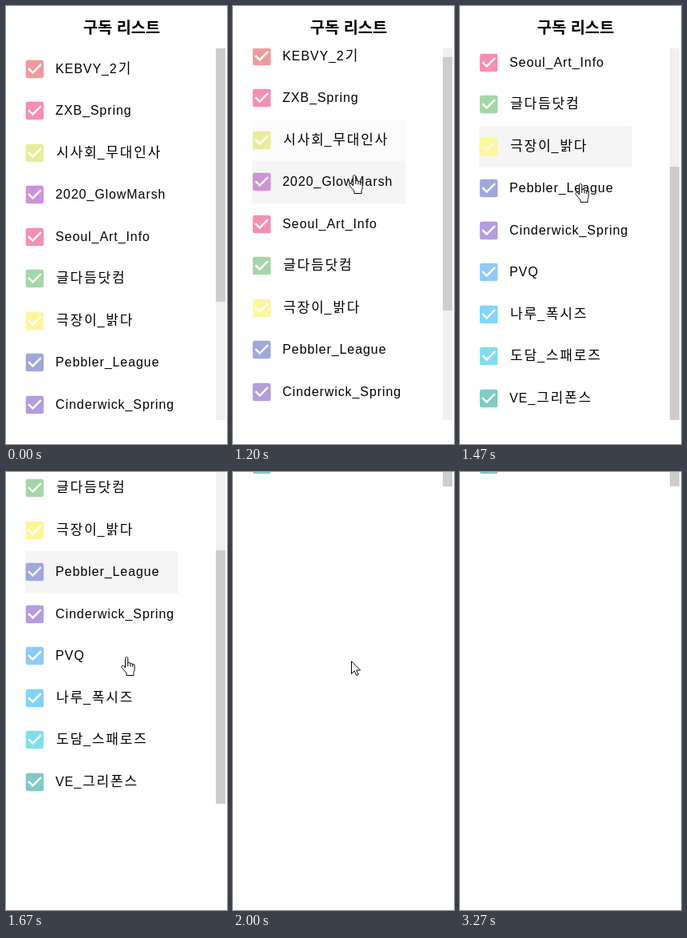
These frames come from a looping animation (277x548 px, 4340 ms). An HTML page:

```html
<!DOCTYPE html>
<html lang="ko">
<head>
<meta charset="utf-8">
<style>
html, body { margin: 0; width: 100%; height: 100%; overflow: hidden; background: #fff; }
#page { position: absolute; top: 0; left: 0; width: 277px; height: 548px; color: #000; }
h3 { position: absolute; margin: 0; left: 20px; top: 11px; width: 250px; text-align: center;
  font: bold 19.8px/29px "Noto Sans CJK KR", "Noto Sans CJK", sans-serif; }
#view { position: absolute; left: 24px; top: 53px; width: 239px; height: 465px; overflow: hidden; }
#list { position: absolute; left: 0; top: 0; }
.row { position: absolute; left: 0; width: 192px; height: 52.5px; white-space: nowrap;
  font: 16px/52.5px "Liberation Sans", Arial, sans-serif; letter-spacing: .93px; }
.row svg { position: absolute; left: -3px; top: 11px; width: 30px; height: 30px; }
.row p { position: absolute; margin: 0; left: 38px; top: 0; }
.row span { position: relative; left: 1px; letter-spacing: 1.86px;
  font: 300 17px/0 "Noto Sans CJK KR", "Noto Sans CJK", sans-serif; }
#bar { position: absolute; left: 263px; top: 53px; width: 12px; height: 465px; background: #f0f0f0; }
#thumb { position: absolute; left: 0; width: 12px; height: 317px; }
.cursor { position: absolute; display: none; width: 18px; height: 24px; fill: #fff; stroke: #000; stroke-linejoin: round; }
</style>
</head>
<body>
<div id="page">
  <h3>구독 리스트</h3>
  <div id="view"><div id="list"></div></div>
  <div id="bar"><div id="thumb"></div></div>
</div>
<svg id="arrow" class="cursor"><path d="M.5 .8V16.5L4.2 13L6.8 18.5L9.2 17.4L6.7 12H11.6Z"/></svg>
<svg id="hand" class="cursor"><path d="M5.5 14V2.3C5.5 -.1 8.8 -.1 8.8 2.3V8.2C9.3 6.8 12 7 12 9C12.5 7.8 14.7 8.2 14.7 10C15.3 9 17.2 9.4 17.2 11.4V15.5C17.2 18 16 19 16 20.5V23.5H7V21C5.5 18.5 3.5 16.6 1.2 13.6C.2 11.6 2.3 10.4 3.6 11.8Z"/><path d="M8.8 8V12M12 9V12.5M14.7 10V13" fill="none"/></svg>
<script>
const $ = id => document.getElementById(id);
const items = [
  ['KEBVY_2기', '#ef9a9a'], ['ZXB_Spring', '#f48fb1'], ['시사회_무대인사', '#e6ee9c'],
  ['2020_GlowMarsh', '#ce93d8'], ['Seoul_Art_Info', '#f48fb1'], ['글다듬닷컴', '#a5d6a7'],
  ['극장이_밝다', '#fff59d'], ['Pebbler_League', '#9fa8da'], ['Cinderwick_Spring', '#b39ddb'],
  ['PVQ', '#90caf9'], ['나루_폭시즈', '#81d4fa'], ['도담_스패로즈', '#80deea'], ['VE_그리폰스', '#80cbc4']
];
const PITCH = 52.5, LOOP = 4340;
const check = 'M10,17L5,12L6.41,10.58L10,14.17L17.59,6.58L19,8M19,3H5C3.89,3 3,3.89 3,5V19A2,2 0 0,0 5,21H19A2,2 0 0,0 21,19V5C21,3.89 20.1,3 19,3Z';

$('list').innerHTML = items.map(([name, color], i) =>
  `<div class="row" style="top:${i * PITCH - .25}px">
    <svg viewBox="0 0 24 24"><path fill="${color}" d="${check}"/></svg>
    <p>${name.replace(/[가-힣]+/g, '<span>$&</span>')}</p>
  </div>`).join('');
const rows = [...document.querySelectorAll('.row')];

// time, cursor, x, y, list scroll, page scroll, hovered row, fading row
const steps = [
  [0, '', 0, 0, 0, 0],
  [870, 'arrow', 240, 202, 0, 0],
  [930, 'arrow', 218, 204, 0, 0],
  [1000, 'hand', 190, 206, 0, 0, 2],
  [1070, 'hand', 168, 208, 0, 0, 2],
  [1130, 'hand', 155, 210, 3, 0, 2],
  [1200, 'hand', 151, 212, 16, 0, 3, 2],
  [1270, 'hand', 151, 215, 60, 0, 3],
  [1330, 'hand', 151, 218, 112, 0, 4],
  [1400, 'hand', 150, 221, 165, 0, 5],
  [1470, 'hand', 150, 223, 218, 0, 6],
  [1530, 'hand', 150, 227, 218, 5, 7],
  [1600, 'hand', 150, 230, 218, 45, 7],
  [1670, 'hand', 150, 232, 218, 103, 7],
  [1730, 'hand', 150, 234, 218, 183, 8],
  [1800, 'hand', 149, 235, 218, 270, 9],
  [1870, 'hand', 149, 236, 218, 350, 11],
  [1930, 'hand', 149, 236, 218, 430],
  [2000, 'arrow', 148, 236, 218, 500],
  [3200, 'arrow', 149, 236, 218, 500],
  [3270, '', 0, 0, 218, 500]
];

function draw(t) {
  const [time, cursor, x, y, scroll, page, hover, fade] = steps.findLast(s => s[0] <= t);
  $('page').style.top = -page + 'px';
  $('list').style.top = -scroll + 'px';
  $('thumb').style.top = Math.round(scroll * 148 / 218) + 'px';
  $('thumb').style.background = time === 870 ? '#a6a6a6' : '#cdcdcd';
  rows.forEach((row, i) => {
    row.style.background = i === hover ? '#f5f5f5' : i === fade ? '#fbfbfb' : '';
  });
  for (const id of ['arrow', 'hand']) {
    const s = $(id).style, tip = id === 'hand' ? [6, 1] : [0, 0];
    s.display = id === cursor ? 'block' : 'none';
    s.left = x - tip[0] + 'px';
    s.top = y - tip[1] + 'px';
  }
}

const start = performance.now();
function tick() {
  draw((performance.now() - start) % LOOP);
  requestAnimationFrame(tick);
}
tick();
</script>
</body>
</html>
```
